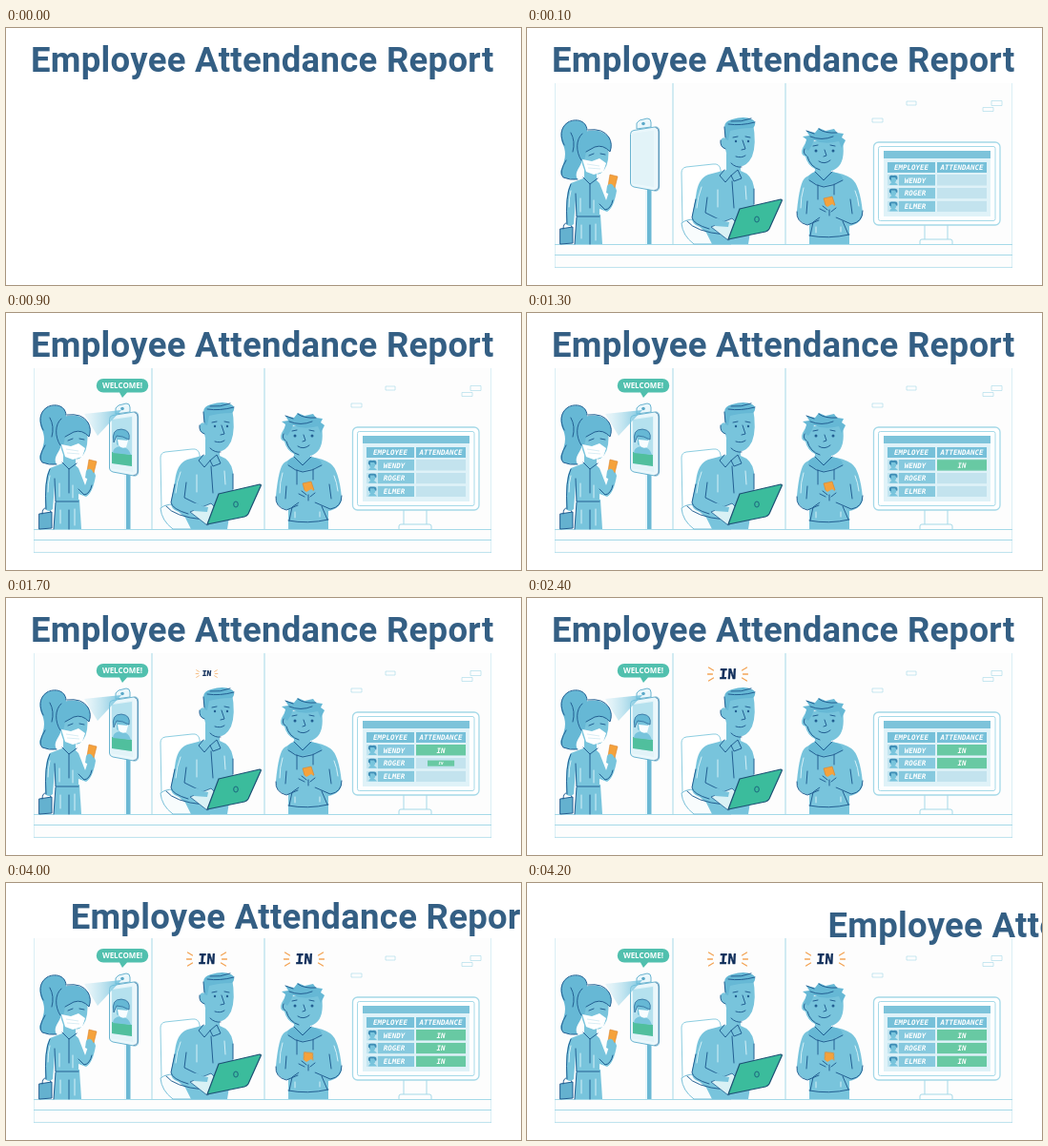
Write an HTML page that moves like this. It is 540 px wide and 270 px high and loops after 4.3 s.

```html
<!DOCTYPE html>
<html lang="en">
<head>
<meta charset="utf-8">
<title>Employee Attendance Report</title>
<style>
  html, body { margin: 0; width: 100%; height: 100%; overflow: hidden; background: #fff; }
  svg { display: block; width: 540px; height: 270px; }
  .title { font: 700 36.5px Roboto, sans-serif; letter-spacing: .3px; fill: #345f84; }
  .hand { font: italic 700 7.5px "DejaVu Sans Mono", monospace; fill: #fff; text-anchor: middle; }
  .big { font-size: 15px; font-style: normal; fill: #12305c; stroke: #12305c; stroke-width: .4; }
  .hello { font: 700 8px "Open Sans", sans-serif; fill: #fff; text-anchor: middle; }
  .thin { fill: none; stroke: #a5d9e8; stroke-width: 1; }
  .body { fill: #78c4dc; }
  .hair { fill: #66b8d5; }
  .ink { fill: none; stroke: #235f92; stroke-width: 1; stroke-linecap: round; stroke-linejoin: round; }
  .shine { fill: none; stroke: #d5f0f7; stroke-width: 1; stroke-linecap: round; }
  .card { fill: #f5a23c; stroke: #d9822b; stroke-width: .6; }
</style>
</head>
<body>
<svg viewBox="0 0 540 270">
  <defs>
    <linearGradient id="light" x1="1" x2="0">
      <stop offset="0" stop-color="#5fb9d8" stop-opacity=".85"/>
      <stop offset="1" stop-color="#b9e3f0" stop-opacity=".25"/>
    </linearGradient>
    <g id="in">
      <text class="hand big" y="5.500" transform="skewX(-4)">IN</text>
      <path d="M-20-6l5 3M-21 1h5M-20 8l5-3M20-6l-5 3M21 1h-5M20 8l-5-3"
        fill="none" stroke="#f3a455" stroke-width="1.3" stroke-linecap="round"/>
    </g>
    <g id="face">
      <path class="body" d="M-3-3h6v4q-3 4-6 0zM-4 5q1-3 4-3t5 3z"/>
      <path d="M-4-1q-1-5 4-4 6-1 4 5l-2-3h-4v3z" fill="#3f8fb7"/>
    </g>
  </defs>

  <g id="scene">
    <!-- walls and floor -->
    <path d="M29 58H509V252H29z" fill="#fdfdfd"/>
    <path class="thin" d="M29.5 58V252M508.5 58V252" opacity=".4"/>
    <path class="thin" d="M153 58V227M271 58V227" stroke-width="1.6"/>
    <path class="thin" d="M29 227.500H509M29 238.500H509"/>
    <path class="thin" d="M29 251.500H509" opacity=".7"/>
    <path class="thin" d="M398 77h10v4h-10zM487 76.500h11v5h-11zM478 83.500h11v4h-11zM362 95h11v4h-11z" opacity=".6"/>

    <!-- monitor -->
    <g class="thin">
      <path d="M417 207V222M441 207V222M412 227v-3q0-2 2-2h30q2 0 2 2v3"/>
      <rect x="363.500" y="120" width="132.500" height="87" rx="5" fill="#fff" stroke-width="1.3"/>
      <rect x="368.500" y="124.500" width="122.500" height="78" rx="2"/>
    </g>
    <rect x="374" y="129" width="112" height="69" fill="#dff2f8"/>
    <rect x="374" y="129" width="112" height="8" fill="#7dc3da"/>
    <path d="M378 141h50v11h-50zM430 141h52v11h-52z" fill="#76c0d9"/>
    <text class="hand" x="403" y="149.300">EMPLOYEE</text>
    <text class="hand" x="456" y="149.300">ATTENDANCE</text>
    <g id="rows"></g>

    <!-- check-in terminal -->
    <path d="M124 168h6v59h-6z" fill="#eaf7fb"/>
    <path d="M126 168h4.500v59h-4.500z" fill="#6bb8d4"/>
    <path d="M115 106v-6l3-3 8-2q4 0 4 4v5z" fill="#eaf7fb" stroke="#6bb4d0"/>
    <circle cx="122" cy="100.500" r="1.800" fill="#5ba9c9"/>
    <path d="M112 107.500L134 104Q138.500 103.500 138.500 108V167Q138.500 171.500 134 171L112 167Q108.500 166 108.500 163V111.500Q108.500 108 112 107.500Z" fill="#eaf7fb" stroke="#6bb4d0"/>
    <path class="ink" d="M135 104.500Q138 105 138 109V166Q138 170 134 170.500" stroke-width="1.300" opacity=".6"/>
    <path d="M110.500 111L133 107.500V167L110.500 163.500Z" fill="#e2f3f8"/>
    <g id="screen">
      <path d="M111 112L132 109V161L111 158Z" fill="#b5e1ee"/>
      <path d="M111 146L132 149V161L111 158Z" fill="#50bf9d"/>
      <path class="body" d="M112 147q0-6 8-7 9 1 11 9zM116 126h11v11q-5 6-11 1z"/>
      <path class="hair" d="M113 136q-3-14 8-14 10 1 8 11-7-4-13-4z" stroke="#235f92" stroke-width=".7"/>
      <path d="M117 133l11 1-2 7q-5 2-8-2z" fill="#f8fdff"/>
    </g>
    <path id="beam" d="M121 102L82 106 96 129Z" fill="url(#light)"/>
    <g transform="translate(122 78)"><g id="welcome">
      <path d="M-20-9H20a7.250 7.250 0 0 1 0 14.500H5L0 11l-3-5.500H-20a7.250 7.250 0 0 1 0-14.500z" fill="#51c0ae"/>
      <text class="hello" x="0" y="1.300">WELCOME!</text>
    </g></g>

    <!-- woman with a card -->
    <path d="M35 211L48 209V226L35 227Z" fill="#64b1cf"/>
    <path class="ink" d="M38 211q0-7 5-6 3 0 4 4M35 211l13-2v17l-13 1z"/>
    <path class="body" d="M52 196H77L79 227H50Z"/>
    <path class="hair" d="M63 108C63 96 51 95 43 99C35 104 34 113 37 121C42 130 40 139 36 148C33 155 38 160 53 159C49 152 55 148 58 139L62 116Z"/>
    <path class="ink" d="M63 107C62 96 50 95 43 99C34 105 35 115 39 123M41 139Q33 152 38 157Q45 160 53 159M46 110q5 9 2 20"/>
    <path class="body" d="M58 122H85Q87 141 81 149Q76 155 73 153V161H60V149Q55 138 58 122Z"/>
    <path class="hair" d="M57 139C51 130 51 117 58 111C66 105 80 107 86 115Q90 122 87 130Q80 122 71 125L62 130 60 140Z"/>
    <path class="ink" d="M57 139C51 130 51 117 58 111M64 107Q80 105 86 115Q90 122 87 130Q80 122 71 125L62 130M65 134l5-2M77 132l5 1"/>
    <path d="M58 138L68 140 76 137 83 142 80 151 70 154 62 151Z" fill="#fff"/>
    <path d="M63 143l13 2M64 147l13 1" stroke="#c8e6ef" stroke-width=".7"/>
    <path class="body" d="M59 158L46 163Q40 171 41 206Q45 210 49 206L51 181L52 201H76L76 190L84 193Q91 189 94 171Q92 164 88 166L83 181L76 163 71 158Z"/>
    <path class="ink" d="M59 157L66 164 74 158M66 164v25M51 174L52 198H76M42 206Q40 176 46 164M76 185L82 191Q88 190 90 181M52 199l-2 28M66 207v20"/>
    <path class="shine" d="M46 171q-2 7-2 17M56 179v14M70 181v13M57 207v14M72 206v17"/>
    <path class="card" d="M87 154l8 2-3 12-7-2z"/>
    <path class="body" d="M84 166q3-4 6-1l3 5-4 6-6-3z"/>

    <!-- man with a laptop -->
    <path d="M163 205L162 152Q162 147 167 146L195 143Q202 142 203 149L206 205Z" fill="#fff" stroke="#8ccde0"/>
    <path d="M162 205Q168 199 187 202L214 224V227H175Q163 218 162 205Z" fill="#f8fcfd" stroke="#78bfd8"/>
    <path class="body" d="M209 132V149L190 154Q179 158 177 177L173 198Q172 206 181 209L188 215 194 227H232L238 190V167Q236 154 224 150V138Z"/>
    <path class="body" d="M207 104L237 100Q241 122 236 135Q229 149 217 144Q210 139 208 127Q202 125 203 118Q205 114 208 116Z"/>
    <path class="hair" d="M208 117L207 104Q207 98 215 96Q228 92 236 96Q242 99 237 105Q224 105 213 108L211 118Z"/>
    <path class="ink" d="M208 115L207 104M211 101Q224 103 239 99M214 98Q225 99 235 95M208 127Q202 125 203 118M216 115l5-1M229 114l5 1M226 118l3 9-4 1M219 135q6 2 10-1M214 142q5 5 11 4"/>
    <g fill="#235f92"><circle cx="219" cy="119" r="1.200"/><circle cx="232" cy="119" r="1.200"/></g>
    <path class="ink" d="M207 149L202 155 208 162 214 155 221 149 225 158 217 161 214 155M215 161L217 189M189 178L187 194 207 204M177 180L173 199Q174 206 191 211M168 203Q176 214 207 217M238 169v16"/>
    <path class="shine" d="M183 167q-4 10-5 22M200 170v18M229 166l1 14"/>
    <path d="M193 209L215 200 227 212 211 223Z" fill="#d9f1f5" stroke="#235f92" stroke-width=".8"/>
    <path class="body" d="M193 200q10-1 13 3l6 1-1 5-14-1z"/>
    <path d="M223 190L266 180Q268 180 267 182L254 211Q253 213 250 214L211 222Z" fill="#3bbc9c" stroke="#1c5074" stroke-width="1.200"/>
    <ellipse cx="241" cy="201" rx="2.300" ry="3" fill="none" stroke="#1c6680"/>

    <!-- man in a hoodie -->
    <path class="body" d="M293 119L331 119Q334 140 325 147Q321 150 319 150V159H302V148Q294 144 292 135Q286 133 289 126Z"/>
    <path class="hair" d="M291 126L293 117 289 114 296 113 293 108 302 110 306 105 313 108 322 106 325 110 332 111 330 115 334 118 330 126 327 119Q312 123 301 118Q298 125 295 129Z"/>
    <path class="ink" d="M293 108L301 111M306 106Q312 111 325 110M297 114Q309 119 321 114M294 135Q297 146 307 149M291 127q-2 5 2 7M300 124l5-1M318 123l5 1M312 128l2 6-3 1M306 140q6 4 12-1"/>
    <g fill="#235f92"><circle cx="303" cy="129" r="1.500"/><circle cx="321" cy="129" r="1.500"/></g>
    <path class="body" d="M302 151L292 157Q286 161 283 192Q282 204 296 207V227H338V208Q352 205 352 194Q349 164 340 158Q333 153 319 151Z"/>
    <path class="hair" d="M302 151Q293 154 296 161L310 166 330 161Q334 154 319 151L311 158Z"/>
    <path class="ink" d="M302 151L311 160 320 151M296 160Q303 166 311 167Q322 166 331 160M305 165v15M322 164v11M294 182L293 195M339 180L341 195M296 218Q316 222 338 217M297 218L300 204 307 199M337 217L331 203M283 193Q282 204 294 207L306 202M352 192Q352 204 340 206L324 199"/>
    <path class="shine" d="M290 168q-3 10-3 21M344 171q3 7 4 16M303 209v6M329 209v5"/>
    <g transform="translate(316 183)"><path id="phone" class="card" d="M-5-4L4-6 7 3-2 7Z"/></g>
    <path class="body" d="M304 190q3-5 7-5l4 3 5-3 6 5-1 8-8 3-12-3z"/>
    <path class="ink" d="M307 190l6 3M310 187l5 4M324 189l-5 4M317 191v6"/>

    <g transform="translate(210.500 79)"><use id="in1" href="#in"/></g>
    <g transform="translate(312.500 79)"><use id="in2" href="#in"/></g>
  </g>

  <text id="title" class="title" x="26" y="46">Employee Attendance Report</text>
</svg>
<script>
  const LOOP = 4300;
  const get = id => document.getElementById(id);

  get('rows').innerHTML = ['WENDY', 'ROGER', 'ELMER'].map((name, i) => {
    const y = 154 + i * 13.8;
    return `<g transform="translate(0 ${y})">
      <rect x="378" width="12" height="11.5" fill="#c3e5f0"/>
      <use href="#face" x="384" y="6"/>
      <rect x="390" width="38" height="11.5" fill="#86c9de"/>
      <text class="hand" x="407" y="8.500">${name}</text>
      <rect x="430" width="52" height="11.5" fill="#c3e3ee"/>
      <g transform="translate(456 5.750)"><g id="cell${i}">
        <rect x="-26" y="-5.750" width="52" height="11.5" fill="#68c9a3"/>
        <text class="hand" y="2.750">IN</text>
      </g></g></g>`;
  }).join('');

  // steps: [ms, value, easing to the next step]
  function play(id, prop, steps) {
    const first = steps[0], last = steps[steps.length - 1];
    const all = [[0, first[1]], ...steps, [LOOP, last[1]]];
    get(id).animate(
      all.map(([ms, value, easing = 'linear']) => ({ offset: ms / LOOP, [prop]: value, easing })),
      { duration: LOOP, iterations: Infinity }
    );
  }

  const grow = (id, from, to) => play(id, 'transform', [[from, 'scale(0)'], [to, 'scale(1)']]);
  const fade = (id, from, to) => play(id, 'opacity', [[from, 0], [to, 1]]);
  const pop = (id, from, to) => play(id, 'transform',
    [[from, 'scale(0)'], [to, 'scale(1)'], [to + 80, 'scale(1.1)'], [to + 200, 'scale(1)']]);

  play('scene', 'opacity', [[100, 0], [100, 1]]);
  fade('beam', 350, 650);
  fade('screen', 350, 650);
  grow('welcome', 500, 850);
  grow('cell0', 910, 1200);
  grow('cell1', 1465, 1900);
  pop('in1', 1465, 1900);
  grow('cell2', 2565, 2980);
  pop('in2', 2565, 2950);
  play('phone', 'transform', [[2600, 'rotate(0deg)'], [2900, 'rotate(18deg)']]);
  play('title', 'transform', [
    [3900, 'translate(0, 0)', 'cubic-bezier(.4, 0, .8, .7)'],
    [4200, 'translate(288px, 11px)'],
    [4300, 'translate(430px, 16px)']
  ]);
</script>
</body>
</html>
```
